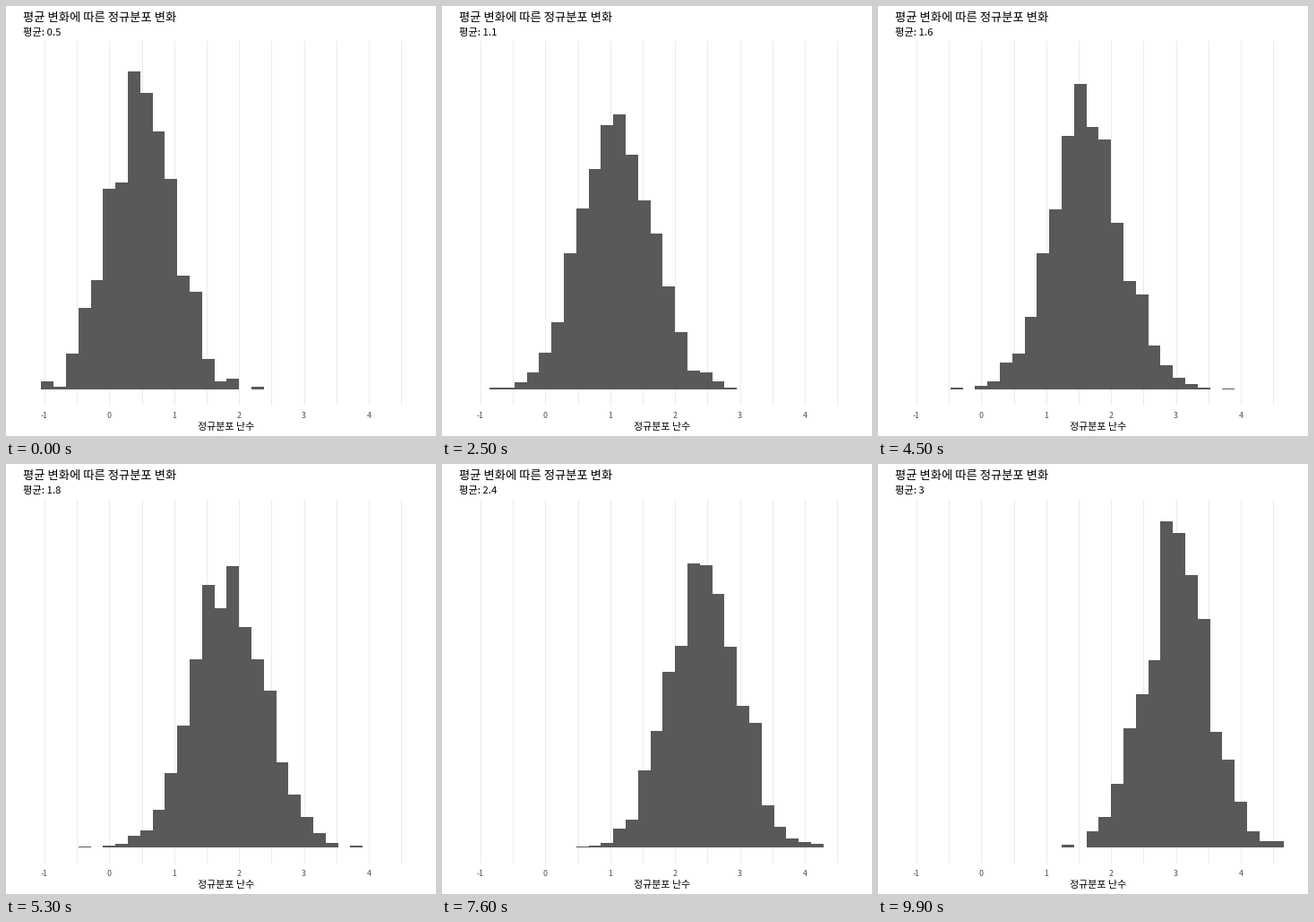
These frames come from a looping animation (480x480 px, 10 s). A matplotlib script:

```python
import matplotlib.pyplot as plt
import numpy as np
from matplotlib.animation import FuncAnimation
from matplotlib.patches import Rectangle

SIZE, DPI = 480, 100
FRAMES, INTERVAL = 100, 100
BINS = 30
BASE = 427.55          # y of zero count
UNIT = 370 / 167       # pixels per count
MEANS = np.linspace(0.5, 3, 6)

# First occupied bin and the counts from there on, one row per mean
HISTS = [
    (0, [4, 1, 18, 41, 55, 101, 104, 160, 149, 130, 106, 57, 49, 15, 4, 5, 0, 1]),
    (1, [1, 1, 4, 11, 24, 43, 85, 113, 132, 148, 148, 108, 71, 58, 30, 16, 3, 2, 2]),
    (3, [1, 0, 2, 5, 18, 24, 47, 88, 109, 148, 167, 139, 116, 67, 29, 28, 9, 3]),
    (8, [1, 6, 14, 39, 70, 116, 112, 153, 131, 125, 102, 58, 37, 22, 10, 3, 0, 1]),
    (11, [4, 4, 25, 49, 77, 96, 146, 149, 140, 112, 80, 72, 24, 12, 5, 3, 2]),
    (12, [1, 0, 8, 15, 32, 60, 77, 94, 164, 158, 137, 115, 58, 44, 23, 8, 3, 3]),
]

counts = np.zeros((len(HISTS), BINS))
for row, (start, values) in zip(counts, HISTS):
    row[start:start + len(values)] = values

span = MEANS[-1] - MEANS[0]
keys = np.round((FRAMES - 1) * (MEANS - MEANS[0]) / span)

plt.rcParams["font.family"] = "Noto Sans CJK JP"
fig = plt.figure(figsize=(SIZE / DPI, SIZE / DPI), dpi=DPI, facecolor="white")
ax = fig.add_axes([0, 0, 1, 1])
ax.set_xlim(0, SIZE)
ax.set_ylim(SIZE, 0)
ax.axis("off")


def label(x, y, text, px, color="black", ha="left"):
    return ax.text(x, y, text, fontsize=px * 72 / DPI, color=color,
                   ha=ha, va="baseline")


def box(x, y, w, h, color):
    return ax.add_patch(Rectangle((x, y), w, h, facecolor=color, linewidth=0))


def x_pos(value):
    return 115.4 + 72.4 * value


for v in np.arange(-1, 4.6, 0.5):
    box(round(x_pos(v)), 39, 1, 407, "#EBEBEB")
for v in range(-1, 5):
    label(x_pos(v), 459.5, str(v), 8.8, "#4D4D4D", "center")

label(18.7, 17, "평균 변화에 따른 정규분포 변화", 13.3)
subtitle = label(18.7, 32.5, "", 11.3)
label(245.9, 473, "정규분포 난수", 11, ha="center")

edges = np.round(39.4 + 13.8 * np.arange(BINS + 1))
floor = round(BASE)
bars = [box(a, floor, b - a, 0, "#595959") for a, b in zip(edges, edges[1:])]


def update(i):
    mean = MEANS[0] + span * i / (FRAMES - 1)
    subtitle.set_text(f"평균: {round(mean, 1):g}")
    for bar, col in zip(bars, counts.T):
        top = round(BASE - UNIT * np.interp(i, keys, col))
        bar.set_y(top)
        bar.set_height(floor - top)
    return [subtitle, *bars]


anim = FuncAnimation(fig, update, frames=FRAMES, interval=INTERVAL,
                     repeat=True, repeat_delay=0, blit=False)
plt.show()
```
